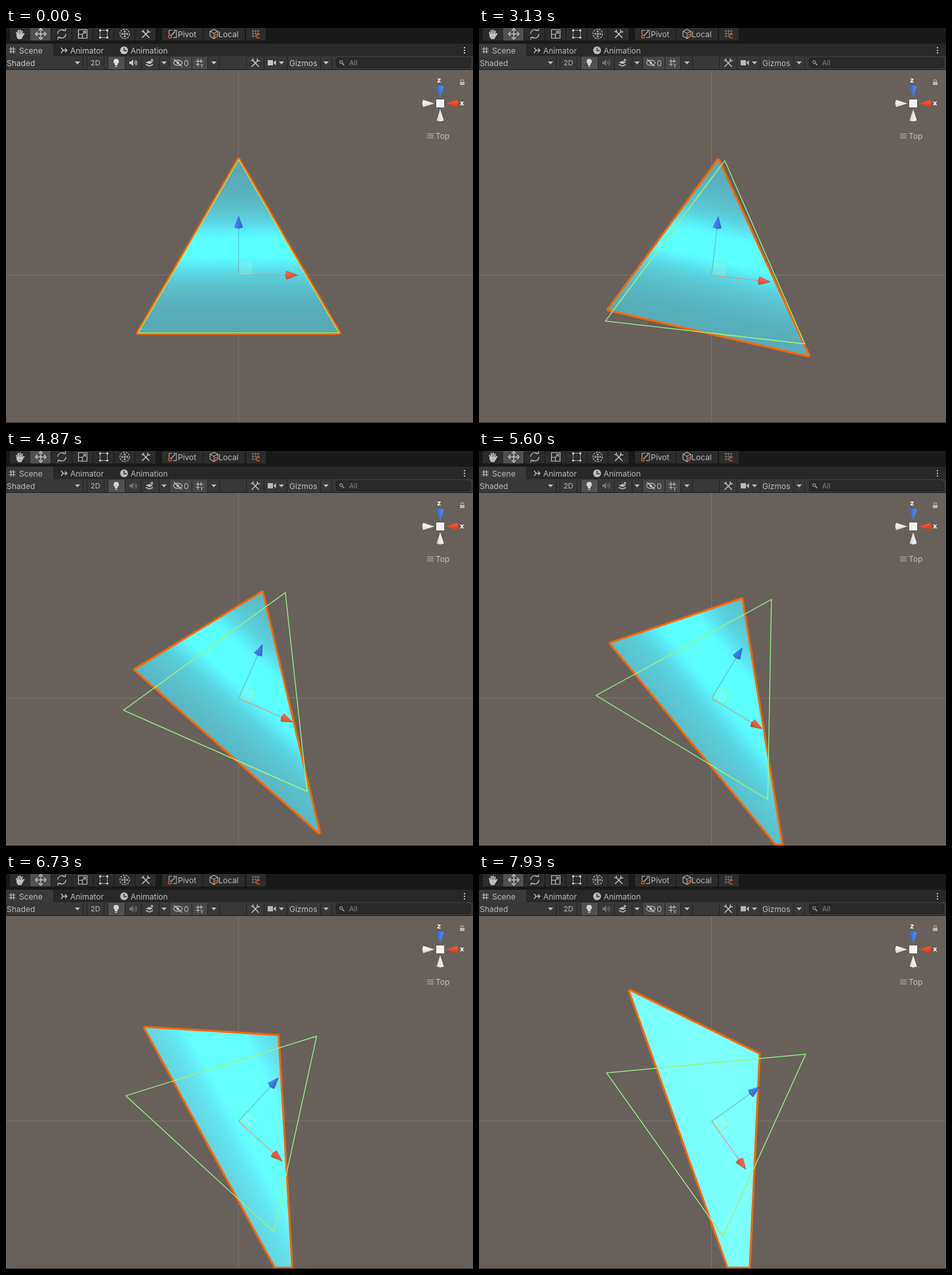
Write an HTML page with a canvas that moves like this. It is 712x602 px and loops after 8 s.

```html
<!DOCTYPE html>
<html lang="en">
<head>
<meta charset="utf-8">
<title>Scene view</title>
<style>
html, body { margin: 0; width: 100%; height: 100%; overflow: hidden; background: #69625c; }
canvas { display: block; }
</style>
</head>
<body>
<canvas id="stage" width="712" height="602"></canvas>
<script>
const ctx = document.getElementById('stage').getContext('2d');
const W = 712, LOOP = 8000, FPS = 15;
const OX = 354.7, OY = 376.8, FLOOR = 601;
const TRI = [[0, -176], [153, 87.7], [-153, 87.7]];
const INK = '#c4c4c4', RED = '#e0583a';

function rect(x, y, w, h, color) {
  ctx.fillStyle = color;
  ctx.fillRect(x, y, w, h);
}
function trace(pts, closed) {
  ctx.beginPath();
  pts.forEach(([x, y], i) => i ? ctx.lineTo(x, y) : ctx.moveTo(x, y));
  if (closed) ctx.closePath();
}
function fill(pts, color) {
  trace(pts, true);
  ctx.fillStyle = color;
  ctx.fill();
}
function line(pts, color = INK, width = 1, closed = false) {
  trace(pts, closed);
  ctx.strokeStyle = color;
  ctx.lineWidth = width;
  ctx.stroke();
}
function arc(x, y, r, a0 = 0, a1 = 7, color = INK, width = 1.2) {
  ctx.beginPath();
  ctx.arc(x, y, r, a0, Math.min(a1, a0 + Math.PI * 2));
  ctx.strokeStyle = color;
  ctx.lineWidth = width;
  ctx.stroke();
}
function dot(x, y, r, color = INK) {
  ctx.beginPath();
  ctx.arc(x, y, r, 0, 7);
  ctx.fillStyle = color;
  ctx.fill();
}
function text(s, x, y, color = INK, font = '12px') {
  ctx.font = font + ' Inter, sans-serif';
  ctx.fillStyle = color;
  ctx.fillText(s, x, y);
}
function at(x, y, angle, draw) {
  ctx.save();
  ctx.translate(x, y);
  ctx.rotate(angle);
  draw();
  ctx.restore();
}
const quarters = draw => [0, 1, 2, 3].forEach(i => at(0, 0, i * Math.PI / 2, draw));
const drop = x => fill([[x - 4, 51], [x + 4, 51], [x, 55.5]], INK);

// ---- toolbar icons, each around its own centre ----
function hand() {
  [[-5, -3], [-2.4, -6], [.6, -6.5], [3.6, -5]].forEach(([x, y]) =>
    line([[x, y], [x * .7, 3]], INK, 2.1));
  line([[6.6, -1], [3, 4]], INK, 2.2);
  fill([[-5, 0], [4, 0], [5, 3], [2.5, 8], [-2.5, 8], [-5, 4]], INK);
}
function move() {
  quarters(() => {
    line([[0, 0], [0, -6]], '#e0e0e0', 1.2);
    line([[-3, -5.2], [0, -8], [3, -5.2]], '#e0e0e0', 1.3);
  });
}
function turn() {
  arc(0, 0, 6.3, -3.1, -.9, INK, 1.3);
  arc(0, 0, 6.3, 0, 2.2, INK, 1.3);
  line([[1, -6], [5.5, -5], [6, -8.5]], INK, 1.3);
  line([[-1, 6], [-5.5, 5], [-6, 8.5]], INK, 1.3);
}
function scale() {
  line([[-6.5, -6.5], [6.5, -6.5], [6.5, 6.5], [-6.5, 6.5]], INK, 1.2, true);
  line([[-6, .5], [-.5, .5], [-.5, 6]], INK, 1.2);
  line([[0, 0], [4, -4]], INK, 1.2);
  line([[0, -4], [4, -4], [4, 0]], INK, 1.2);
}
function frame() {
  ctx.setLineDash([3, 1]);
  line([[-5.5, -5.5], [5.5, -5.5], [5.5, 5.5], [-5.5, 5.5]], INK, 1, true);
  ctx.setLineDash([]);
  quarters(() => rect(-7, -7, 3, 3, INK));
}
function orbit() {
  ctx.setLineDash([3, 1.4]);
  arc(0, 0, 7.2);
  ctx.setLineDash([]);
  quarters(() => {
    line([[0, 0], [0, -4.5]]);
    line([[-2, -3], [0, -5], [2, -3]]);
  });
}
function tools() {
  line([[-5.5, 6], [4, -3.5]], INK, 1.6);
  line([[-4, -4], [5.5, 6]], INK, 1.6);
  line([[-6.5, -3.5], [-3.5, -3.5], [-3.5, -6.5]], INK, 1.5);
  line([[3, -6.5], [3.5, -3], [7, -3]], INK, 1.7);
}
function pivotIcon() {
  line([[-1, -5.5], [-5.5, -5.5], [-5.5, 1]]);
  line([[1, 5.5], [6, 5.5], [6, -5.5], [1, -5.5]]);
  line([[-3, 3], [4, -4]], INK, 1.2);
  arc(-4, 4, 2.2, 0, 7, RED, 1.4);
}
function cube() {
  line([[0, -7], [6, -4], [6, 3.5], [0, 7], [-6, 3.5], [-6, -4]], INK, 1.1, true);
  line([[-6, -4], [0, -1], [6, -4]]);
  line([[0, -1], [0, 7]]);
  dot(3, 3, 2.6, '#2c2c2c');
  arc(3, 3, 2, 0, 7, RED, 1.3);
}
function snap() {
  [-4.5, -.5, 3.5].forEach(p => {
    line([[-6.5, p], [5.5, p]], '#777');
    line([[p, -6.5], [p, 5.5]], '#777');
  });
  rect(-.5, .5, 8, 8, '#2b2b2b');
  arc(3, 3.5, 2.5, Math.PI / 2, Math.PI * 1.5, RED, 1.5);
  line([[3, 1], [6, 1]], RED, 1.5);
  line([[3, 6], [6, 6]], RED, 1.5);
}
function hash(s = 1) {
  [-2, 2].forEach(p => {
    line([[-5 * s, p * s], [5 * s, p * s]], INK, 1.1);
    line([[p * s, -5 * s], [p * s, 5 * s]], INK, 1.1);
  });
}
function branch() {
  line([[-4, -4], [-1, 0], [5, 0]], INK, 1.3);
  line([[-4, 4], [-1, 0]], INK, 1.3);
  line([[2, -3], [5, 0], [2, 3]], INK, 1.3);
}
function clock() {
  dot(0, 0, 6);
  line([[0, -4], [0, .5], [4, .5]], '#282828', 1.4);
}
function bulb() {
  dot(0, -2, 4, '#dcdcdc');
  rect(-2, 1, 4, 3, '#dcdcdc');
  rect(-1.5, 5, 3, 1.3, '#dcdcdc');
}
function speaker() {
  fill([[-6, -2], [-3.5, -2], [0, -5], [0, 5], [-3.5, 2], [-6, 2]], INK);
  arc(0, 0, 2.7, -.9, .9);
  arc(0, 0, 5.3, -.9, .9);
}
function layers() {
  fill([[-6, -.5], [0, -3], [5, -.5], [0, 2]], INK);
  line([[-6, 2.5], [0, 5], [5, 2.5]], INK, 1.4);
  at(3.5, -4, 0, () => quarters(() => fill([[-1.1, 0], [1.1, 0], [0, -3]], INK)));
}
function eye() {
  ctx.beginPath();
  ctx.ellipse(0, 0, 6.5, 3.8, 0, 0, 7);
  ctx.strokeStyle = INK;
  ctx.lineWidth = 1.2;
  ctx.stroke();
  dot(0, 0, 2);
  line([[-6, -5.5], [6, 5.5]], INK, 1.4);
}
function gridIcon() {
  hash(1.15);
  rect(0, 0, 7, 7, '#464646');
  line([[1, 1.5], [3.5, 4], [6, 1.5]]);
  line([[3.5, 4], [3.5, 7]]);
}
function camera() {
  rect(-6, -4, 8, 8, INK);
  fill([[2.5, 0], [6.5, -4], [6.5, 4]], INK);
}
function lens() {
  arc(-1, -1, 2.2, 0, 7, INK, 1);
  line([[1, 1], [3.5, 3.5]], INK, 1.2);
}

function panels() {
  rect(0, 0, W, 24, '#191919');
  for (let i = 0; i < 7; i++) rect(6 + i * 32 - (i ? 1 : 0), 0, 31, 19, i === 1 ? '#505050' : '#2c2c2c');
  [[238, 62], [301, 63], [366, 30]].forEach(([x, w]) => rect(x, 0, w, 19, '#2c2c2c'));
  rect(0, 24, W, 20, '#282828');
  rect(0, 24, 72, 20, '#3a3a3a');
  rect(0, 43, W, 20, '#383838');
  rect(0, 63, W, 1, '#232323');
  rect(156, 44, 25, 19, '#505050');
  rect(250, 44, 33, 19, '#464646');
  rect(284, 44, 23, 19, '#464646');
  [117, 123, 149, 155, 181, 206, 233, 249, 283, 307, 325, 366, 393, 428, 479, 496]
    .forEach(x => rect(x, 44, 1, 19, '#232323'));
  ctx.beginPath();
  ctx.roundRect(503.5, 45.5, 205, 15, 3);
  ctx.fillStyle = '#2a2a2a';
  ctx.fill();
  ctx.strokeStyle = '#202020';
  ctx.lineWidth = 1;
  ctx.stroke();
}

function labels(t) {
  ctx.save();
  ctx.globalAlpha = t < 1400 ? 1 : .92;
  [hand, move, turn, scale, frame, orbit, tools].forEach((icon, i) => at(21 + i * 32, 9, 0, icon));
  at(254, 9, 0, pivotIcon);
  text('Pivot', 262, 14);
  at(317, 9, 0, cube);
  text('Local', 324, 14);
  at(381, 9, 0, snap);
  at(9.5, 34, 0, () => hash());
  text('Scene', 20, 39);
  at(88, 34, 0, branch);
  text('Animator', 98, 39);
  at(180, 34, 0, clock);
  text('Animation', 190, 39);
  [30, 34, 38].forEach(y => rect(698, y - 1, 2, 2, INK));
  text('Shaded', 1, 58);
  [109, 241, 317, 420, 488].forEach(drop);
  text('2D', 129, 57, INK, '11px');
  at(168, 53, 0, bulb);
  ctx.save();
  if (t >= 2600) ctx.globalAlpha = .42;
  at(194, 53, 0, speaker);
  ctx.restore();
  at(219, 53, 0, layers);
  at(262, 53, 0, eye);
  text('0', 271, 58);
  at(295, 53, 0, gridIcon);
  at(380, 53, 0, tools);
  at(405, 53, 0, camera);
  text('Gizmos', 432, 58);
  at(512, 53, 0, lens);
  text('All', 523, 57, '#858585', '11px');
  ctx.restore();
}

function compass() {
  const cone = (angle, from, to) => {
    at(662, 115, angle, () => {
      const g = ctx.createLinearGradient(-6, 0, 6, 0);
      g.addColorStop(0, from);
      g.addColorStop(1, to);
      fill([[0, -9], [-5.5, -26], [0, -27.5], [5.5, -26]], g);
    });
  };
  cone(0, '#2f62d8', '#4d92ff');
  cone(Math.PI / 2, '#ff5836', '#d83818');
  cone(Math.PI, '#ffffff', '#cfcfcf');
  cone(-Math.PI / 2, '#d5d5d5', '#ffffff');
  rect(656, 109, 12, 12, '#f4f4f4');
  text('z', 657, 83, '#fff', 'bold 11px');
  text('x', 692, 118, '#fff', 'bold 11px');
  rect(692, 82, 7, 5, '#b8b5b2');
  arc(695.5, 81, 2.2, Math.PI, Math.PI * 2, '#b8b5b2', 1.1);
  [161, 164, 167].forEach(y => rect(642, y, 10, 1, '#b8b5b2'));
  text('Top', 655, 169, '#c0bdba');
}

// Lit band across the mesh; it widens and brightens as the turn goes on.
function shade(deg) {
  const p = deg / 54.5;
  const base = 158 + 25 * p + 62 * p ** 4.5;
  const width = 40 + 22 * p;
  const mid = -42 - 10 * p;
  const glow = 32 * Math.max(0, (p - .55) / .45) ** 1.7;
  const g = ctx.createLinearGradient(0, -176, 0, 88);
  for (let i = 0; i <= 32; i++) {
    const d = (-176 + 264 * i / 32 - mid) / width;
    const k = 1 / (1 + d * d);
    const green = Math.min(255, base + 110 * k);
    const blue = Math.min(255, green + 13);
    g.addColorStop(i / 32, `rgb(${88 + 4 * k + glow},${green},${blue})`);
  }
  return g;
}

function arrow(angle, shaft, dark, light) {
  at(0, 0, angle, () => {
    line([[0, 0], [0, -72]], shaft, 1);
    const g = ctx.createLinearGradient(-6, 0, 6, 0);
    g.addColorStop(0, light);
    g.addColorStop(1, dark);
    fill([[0, -90.5], [6.5, -73], [0, -71], [-6.5, -73]], g);
    line([[-6.3, -73], [0, -71.5], [6.3, -73], [0, -90]], 'rgba(20,30,60,.25)', .8, true);
  });
}

function scene(deg) {
  const a = deg * Math.PI / 180, c = Math.cos(a), s = Math.sin(a);
  ctx.save();
  ctx.beginPath();
  ctx.rect(0, 64, W, FLOOR - 64);
  ctx.clip();
  rect(0, 64, W, FLOOR - 64, '#68615b');
  rect(354, 64, 1, 538, '#777471');
  rect(0, 376, W, 1, '#777471');

  // The mesh turns in a space stretched twofold along y.
  const mesh = TRI.map(([x, y]) => [OX + x * c - y * s / 2, OY + 2 * x * s + y * c]);
  const solid = TRI.map(([x, y]) => [OX + x * c - y * s, OY + x * s + y * c]);
  ctx.lineJoin = 'round';
  line(mesh, 'rgba(255,102,0,.45)', 7, true);
  line(mesh, '#ff6600', 5.6, true);
  ctx.save();
  ctx.translate(OX, OY);
  ctx.transform(c, 2 * s, -s / 2, c, 0, 0);
  fill(TRI, shade(deg));
  ctx.restore();

  const [top, right, left] = mesh;
  if (right[1] > 600) {
    const cross = q => q[0] + (right[0] - q[0]) * (599.5 - q[1]) / (right[1] - q[1]);
    line([[cross(left), 599.8], [cross(top), 599.8]], '#ff6600', 2.6);
  }

  line(solid, deg ? '#94f58c' : '#b4f25a', 1.25, true);
  if (deg) {
    ctx.save();
    trace(mesh, true);
    ctx.clip();
    line(solid, '#a0f070', 1.25, true);
    ctx.restore();
  }

  at(OX, OY, a, () => {
    rect(0, -20, 20, 20, 'rgba(190,255,225,.18)');
    line([[.5, -20.5], [20, -20.5], [20, -.5], [.5, -.5]], 'rgba(140,242,150,.8)', 1, true);
    arrow(0, 'rgba(70,120,170,.5)', '#3462d8', '#4a88f8');
    arrow(Math.PI / 2, '#f08868', '#d84c2c', '#ff6a48');
  });
  ctx.restore();
  rect(0, FLOOR, W, 1, '#242424');
  compass();
}

function turnAt(t) {
  let step = Math.floor((t + 3.4) * FPS / 1000);
  if (step < 39) return 0;
  if (step < 43) step = 39;
  return (step * 1000 / FPS - 2480) / 100;
}

let start;
function tick(now) {
  start ??= now;
  const t = (now - start) % LOOP;
  ctx.clearRect(0, 0, W, 602);
  panels();
  labels(t);
  scene(turnAt(t));
  requestAnimationFrame(tick);
}
requestAnimationFrame(tick);
</script>
</body>
</html>
```
